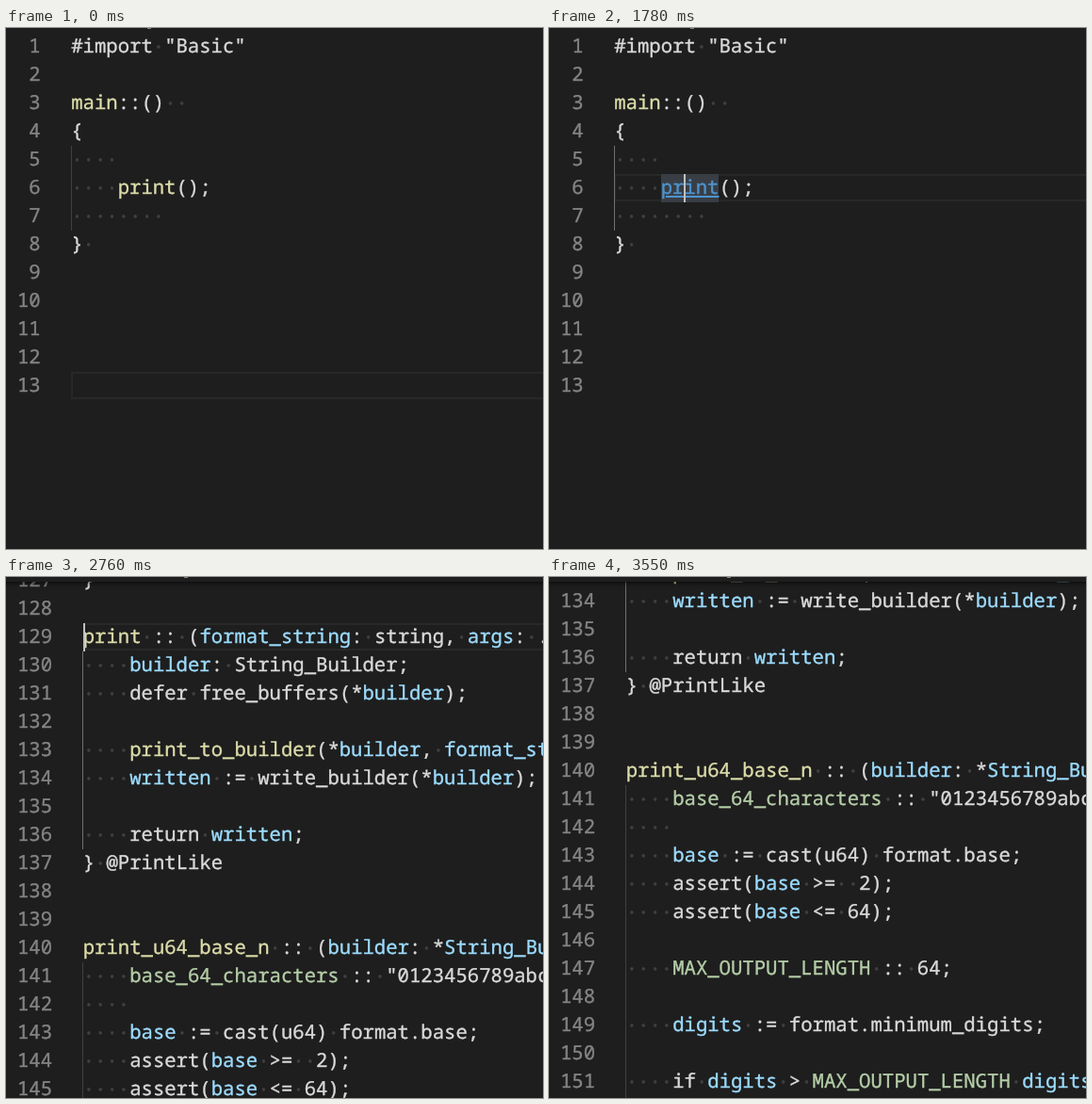
These frames come from a looping animation (570x553 px, 4.61 s). An HTML page:

```html
<!DOCTYPE html>
<html lang="en">
<head>
<meta charset="utf-8">
<title>Go to definition</title>
<style>
  html, body { margin: 0; width: 100%; height: 100%; overflow: hidden; background: #1e1e1e; }
  #stage {
    position: relative; width: 570px; height: 553px; overflow: hidden;
    background: #1e1e1e; color: #dadada;
    font: 20.617px/30px "Noto Sans Mono", "DejaVu Sans Mono", monospace;
    text-rendering: geometricPrecision; font-variant-ligatures: none; white-space: pre;
    -webkit-text-stroke: .35px;
  }
  #stage div { position: absolute; }
  #view { left: 0; top: 5px; width: 570px; height: 548px; overflow: hidden; }
  #shade { inset: 5px 0 0 0; box-shadow: inset 0 6px 6px -6px #000; }
  #crumb { top: 0; width: 4px; height: 1px; background: #8c8378; }
  .pane { left: 0; top: 0; }
  .num { left: 12px; margin-top: -1px; text-align: right; color: #858585; }
  .code { margin-top: -1px; }
  .row { width: 600px; height: 29px; box-sizing: border-box; border: 2px solid #282828; }
  .guide { width: 1px; background: #404040; }
  .guide.on { background: #707070; }
  .mark { width: 61px; height: 30px; }
  .caret { width: 2px; height: 30px; background: #c0c0bd; }
  .fn { color: #dcdcaa; }
  .var { color: #9cdcfe; }
  .const { color: #b5cea8; }
  i { position: relative; top: 1px; font-style: normal; color: #404040; -webkit-text-stroke: .8px; }
  .link { color: #4e94ce; text-decoration: underline 2px; text-underline-offset: 2px; }
  #tip {
    left: 119px; top: 69px; width: 480px; height: 81px; box-sizing: border-box;
    padding: 9px 10px; background: #252526; border: 1px solid #454545;
  }
  #tip i { color: transparent; }
</style>
</head>
<body>
<div id="stage">
  <div id="view"></div>
  <div id="shade"></div>
  <div id="crumb"></div>
</div>
<script>
const LOOP = 4610, ROW = 30, CLIP = 5;
const $ = id => document.getElementById(id);

const kinds = {};
const name = (kind, words) => words.split(' ').forEach(w => kinds[w] = kind);
name('fn', 'main print print_to_builder print_u64_base_n get_u64_from_void_pointer');
name('var', 'builder format_string args written base pointer size_in_bytes digits');
name('const', 'base_64_characters MAX_OUTPUT_LENGTH');

const homeCode = `#import "Basic"

main::()  
{
    
    print();
        
} 




`.split('\n');

const sized = n => `    if size_in_bytes == ${n} return <<cast(`;
const libCode = `    return 0;
}

get_u64_from_void_pointer :: (pointer: *
${[8, 4, 2, 1].map(sized).join('\n')}

    assert(false);

    return 0;
}

print :: (format_string: string, args: ..
    builder: String_Builder;
    defer free_buffers(*builder);

    print_to_builder(*builder, format_string
    written := write_builder(*builder);

    return written;
} @PrintLike


print_u64_base_n :: (builder: *String_Builder
    base_64_characters :: "0123456789abcd
    
    base := cast(u64) format.base;
    assert(base >=  2);
    assert(base <= 64);

    MAX_OUTPUT_LENGTH :: 64;

    digits := format.minimum_digits;

    if digits > MAX_OUTPUT_LENGTH digits



`.split('\n');

// Colours known names and shows spaces as dots.
function paint(text) {
  return text.replace(/</g, '&lt;')
    .replace(/\*String_Builder/, '*<b>')
    .replace(/ +|(?<![.\w])\w+/g, m => {
      if (m[0] === ' ') return `<i>${'·'.repeat(m.length)}</i>`;
      return kinds[m] ? `<span class="${kinds[m]}">${m}</span>` : m;
    })
    .replace('<b>', '<span class="var">String_Builder</span>');
}

function add(parent, cls, left, top, html = '') {
  const el = document.createElement('div');
  el.className = cls;
  if (left !== null) el.style.left = left + 'px';
  el.style.top = top + 'px';
  el.innerHTML = html;
  return parent.appendChild(el);
}

// Row tops are relative to the anchor line.
function makePane(lines, first, anchor, x, guides) {
  const root = add($('view'), 'pane', 0, 0);
  const y = n => (n - anchor) * ROW;
  const row = add(root, 'row', x, 0);
  const mark = add(root, 'mark', x, 0);
  const bars = guides.map(([from, to, on]) => {
    const bar = add(root, on ? 'guide on' : 'guide', Math.floor(x), y(from));
    bar.style.height = (to - from + 1) * ROW + 'px';
    return bar;
  });
  const digits = String(first + lines.length - 1).length;
  lines.forEach((text, i) => {
    add(root, 'num', null, y(first + i), first + i).style.width = digits + 'ch';
    add(root, 'code', x, y(first + i), paint(text));
  });
  const caret = add(root, 'caret', 82, 0);
  return { root, row, mark, bars, caret, y };
}

const home = makePane(homeCode, 1, 1, 69.2, [[5, 7]]);
const lib = makePane(libCode, 115, 129, 81.7,
  [[115, 115], [119, 126], [130, 136, true], [141, 155]]);

const link = home.root.querySelectorAll('.fn')[1];
home.mark.style.cssText += `left:119px;top:${home.y(6)}px;background:#393e45`;
home.caret.style.cssText += `left:143px;top:${home.y(6)}px`;
lib.mark.style.cssText += 'left:82px;background:#623314';

const tip = add(home.root, '', 119, 69,
  paint(libCode[14]) + '\n' + paint(libCode[15]));
tip.id = 'tip';

// [time, wheel notches away from the definition]
const wheel = [
  [0, 0], [2390, 1], [2490, 2], [2560, 3], [2630, 2], [2690, 1], [2760, 0],
  [2950, -1], [3000, -2], [3060, -3], [3110, -4],
  [3440, -3], [3470, -2], [3500, -1], [3520, 0], [3550, 2]
];
const NOTCH = 93.75;

const within = (t, a, b) => t >= a && t < b;
const show = (el, on) => { el.style.visibility = on ? 'inherit' : 'hidden'; };

function draw(t) {
  const opened = t >= 1840, clicked = t >= 800, linked = t >= 960;
  show(home.root, !opened);
  show(lib.root, opened);
  show($('shade'), opened);
  $('crumb').style.left = (opened ? 189 : 150) + 'px';

  home.row.style.top = home.y(clicked ? 6 : 13) + 'px';
  home.bars[0].classList.toggle('on', clicked);
  show(home.caret, clicked && !within(t, 1120, 1620));
  show(home.mark, linked);
  link.classList.toggle('link', linked);
  tip.style.opacity = t < 1780 ? Math.min(1, Math.max(0, (t - 1140) / 120)) : 0;

  const notches = wheel.filter(s => s[0] <= t).pop()[1];
  const top = Math.floor(49 - notches * NOTCH) - CLIP;
  lib.root.style.transform = `translateY(${top}px)`;
  show(lib.mark, opened && t < 2100);
  show(lib.caret, !within(t, 2180, 2600) && !within(t, 3110, 3390));
}

const start = performance.now();
function tick() {
  draw((performance.now() - start) % LOOP);
  requestAnimationFrame(tick);
}
tick();
</script>
</body>
</html>
```
